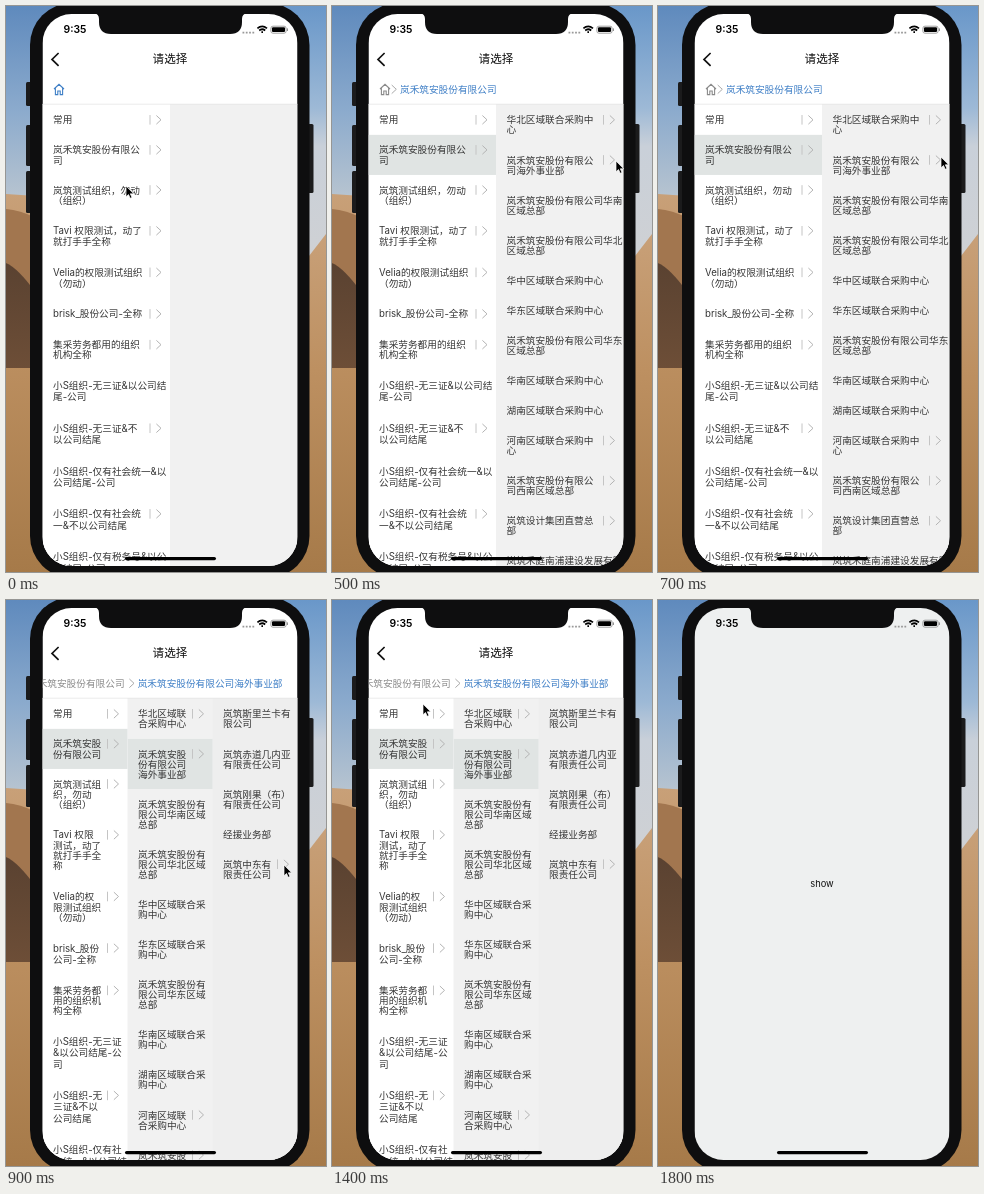
Animation of 320 by 566 pixels, one loop 2000 ms. Source, as an HTML page:

```html
<!DOCTYPE html>
<html lang="zh-CN">
<head>
<meta charset="utf-8">
<title>请选择</title>
<style>
  html, body { margin: 0; width: 100%; height: 100%; overflow: hidden; }
  svg { display: block; width: 320px; height: 566px; }
  text { font: 9.67px Inter, "Noto Sans CJK SC", "Noto Sans CJK", sans-serif; white-space: pre; }
</style>
</head>
<body>
<svg viewBox="0 0 320 566">
  <defs>
    <linearGradient id="skyLeft" x2="0" y2="1">
      <stop stop-color="#5f8abd"/><stop offset=".55" stop-color="#8cabcd"/><stop offset="1" stop-color="#b7c4d0"/>
    </linearGradient>
    <linearGradient id="skyRight" x2="0" y2="1">
      <stop stop-color="#6997c9"/><stop offset=".4" stop-color="#9db9d6"/>
      <stop offset=".55" stop-color="#c9d0d9"/><stop offset="1" stop-color="#cfd1d4"/>
    </linearGradient>
    <linearGradient id="sand" x2="0" y2="1">
      <stop stop-color="#c8a078"/><stop offset=".4" stop-color="#bd9061"/><stop offset="1" stop-color="#a67a49"/>
    </linearGradient>
    <linearGradient id="shade" x2="0" y2="1">
      <stop stop-color="#5a4231"/><stop offset="1" stop-color="#6d4e37"/>
    </linearGradient>
    <clipPath id="screen"><rect x="36.5" y="8" width="255" height="552" rx="29"/></clipPath>
  </defs>

  <rect width="160" height="192" fill="url(#skyLeft)"/>
  <rect x="160" width="160" height="255" fill="url(#skyRight)"/>
  <path d="M0 188L30 190L160 300V566H0Z" fill="url(#sand)"/>
  <path d="M0 203Q14 204 30 212V290L0 257Z" fill="#a2764f"/>
  <path d="M0 257Q12 262 30 287V362H0Z" fill="url(#shade)"/>
  <path d="M160 300L303 250L320 228V566H160Z" fill="url(#sand)"/>

  <g fill="#1b1b1c">
    <rect x="20" y="76" width="8" height="24" rx="1.5"/>
    <rect x="20" y="119" width="8" height="41" rx="1.5"/>
    <rect x="20" y="165" width="8" height="42" rx="1.5"/>
    <rect x="299" y="118" width="8.5" height="69" rx="1.5"/>
  </g>
  <rect x="24" y="-3" width="279.5" height="575" rx="42" fill="#0e0e0f"/>

  <g clip-path="url(#screen)">
    <g id="page"></g>
    <text x="57.5" y="27.3" style="font-size:10.4px;font-weight:600">9:35</text>
    <path d="M236.5 26.6h12" stroke="#999" stroke-width="1.6" stroke-dasharray="1.8 1.5"/>
    <g fill="none" stroke="#000" stroke-width="1.7">
      <path d="M251.4 22.4q4.8-4 9.6 0M253.2 24.5q3-2.5 6 0"/>
      <path d="M255.4 26.2h1.6"/>
    </g>
    <rect x="264.9" y="20.2" width="15.2" height="7" rx="2" fill="none" stroke="#888" stroke-width=".8"/>
    <rect x="266" y="21.3" width="13" height="4.8" rx="1"/>
    <path d="M281.4 22.4v2.6" stroke="#888"/>
    <g id="alert"></g>
    <rect x="119" y="551" width="91" height="3.2" rx="1.6"/>
  </g>
  <path d="M88 7Q93 8 93 13V16Q93 28 105 28H224Q236 28 236 16V13Q236 8 241 7Z" fill="#0e0e0f"/>
  <path id="cursor" d="M0 0V10.8L2.5 8.5L4.2 12.3L6 11.5L4.3 7.8H7.7Z" stroke="#fff" stroke-width=".7"/>
</svg>

<script>
const LEFT = 36.5, WIDTH = 255, TOP = 98.8, EM = 9.67;
const ORG = "岚禾筑安股份有限公司", OVERSEAS = ORG + "海外事业部", MIDEAST = "岚筑中东有限责任公司";

// A trailing ">" marks a row that opens a further column.
const levels = [
  ["常用>", ORG + ">", "岚筑测试组织，勿动（组织）>", "Tavi 权限测试，动了就打手手全称>",
   "Velia的权限测试组织（勿动）>", "brisk_股份公司-全称>", "集采劳务都用的组织机构全称>",
   "小S组织-无三证&以公司结尾-公司", "小S组织-无三证&不以公司结尾>",
   "小S组织-仅有社会统一&以公司结尾-公司", "小S组织-仅有社会统一&不以公司结尾>",
   "小S组织-仅有税务号&以公司结尾-公司"],
  ["华北区域联合采购中心>", OVERSEAS + ">", ORG + "华南区域总部", ORG + "华北区域总部",
   "华中区域联合采购中心", "华东区域联合采购中心", ORG + "华东区域总部", "华南区域联合采购中心",
   "湖南区域联合采购中心", "河南区域联合采购中心>", ORG + "西南区域总部>",
   "岚筑设计集团直营总部>", "岚筑禾庭南浦建设发展有限公司"],
  ["岚筑斯里兰卡有限公司", "岚筑赤道几内亚有限责任公司", "岚筑刚果（布）有限责任公司",
   "经援业务部", MIDEAST + ">"],
  ["中东公司设备部", "中东公司路桥分公司"]
];
const crumbs = [ORG, OVERSEAS, MIDEAST];
const fills = ["#fff", "#f1f1f1", "#eee", "#eee"];

// [start, depth of the open path, alert opacity]; depth -1 is the launch page
const states = [[0, 0, 0], [100, 0, .5], [200, 0, 1], [400, 1, 0], [900, 2, 0],
                [1000, 3, 0], [1300, 2, 0], [1600, 1, 0], [1700, 0, 0], [1800, -1, 0]];
const pointer = [[0, 120, 180], [200, 175, 295], [400, 100, 150], [500, 284, 155], [700, 283, 151],
                 [900, 278, 265], [1100, 277, 272], [1400, 91, 104], [1500, 50, 54], [1800, 48, 53]];

const $ = id => document.getElementById(id);
const escape = s => s.replace(/&/g, "&amp;");
const rect = (x, y, w, h, fill, extra = "") =>
  `<rect x="${x}" y="${y}" width="${w}" height="${h}" fill="${fill}" ${extra}/>`;
const line = (d, color, width = 1) =>
  `<path d="${d}" fill="none" stroke="${color}" stroke-width="${width}"/>`;
const label = (s, x, mid, fill = "#363636", size = EM, extra = "") =>
  `<text x="${x}" y="${mid + size * .37}" fill="${fill}" style="font-size:${size}px;${extra}">${escape(s)}</text>`;
const centred = (s, mid, fill, size, weight = 400) =>
  label(s, 164, mid, fill, size, `text-anchor:middle;font-weight:${weight}`);
const chevron = (x, y, color) => line(`M${x} ${y - 4.3}l4.6 4.3l-4.6 4.3`, color);

const charWidth = c => c > "\u2000" ? 1 : /[A-Z&]/.test(c) ? .65 : c === "-" ? .4 : .45;

function wrap(text, limit) {
  const lines = [""];
  let used = 0;
  for (const c of text) {
    const w = charWidth(c), last = lines.length - 1;
    if (used + w > limit) {
      const carry = lines[last].endsWith("（") ? "（" : "";
      if (carry) lines[last] = lines[last].slice(0, -1);
      lines.push(carry);
      used = carry.length;
    }
    lines[lines.length - 1] += c;
    used += w;
  }
  return lines;
}

function column(level, x, width, selected) {
  let y = TOP, out = rect(x, 98, width, 470, fills[level]);
  for (const row of levels[level]) {
    const opens = row.endsWith(">"), name = opens ? row.slice(0, -1) : row;
    const lines = wrap(name, (width - 10.5 - (opens ? 25 : .5)) / EM);
    const heights = lines.map(s => name.startsWith("小S") ? 11.4 : /[\w-]/.test(s) ? 11.5 : 10.05);
    const height = heights.reduce((a, b) => a + b, 20);
    if (name === selected) out += rect(x, y, width, height, "#e0e4e3");
    let lineTop = y + 10;
    const first = lineTop + heights[0] / 2, right = x + width;
    lines.forEach((s, i) => {
      out += label(s, x + 10.5, lineTop + heights[i] / 2);
      lineTop += heights[i];
    });
    if (opens) out += line(`M${right - 20} ${first - 4.8}v9.6`, "#c4c4c4") + chevron(right - 13.6, first, "#b4b4b4");
    y += height;
  }
  return out;
}

function breadcrumb(depth, dimmed) {
  const scroll = [0, 0, 46, 51][depth], grey = "#8a8a8a", blue = "#3f7fc6";
  let x = 68 - scroll;
  let out = line(`M${48 - scroll} 83l5-4.7l5 4.7m-8.6-1v6.6h2.4v-3.6h2.4v3.6h2.4v-6.6`,
                 depth || dimmed ? grey : blue, 1.1);
  for (let i = 0; i < depth; i++) {
    out += chevron(x - 8.3, 83.3, "#aaa") + label(crumbs[i], x, 83.3, i === depth - 1 ? blue : grey);
    x += crumbs[i].length * EM + 13;
  }
  return out;
}

function page(depth, dimmed) {
  if (depth < 0) return rect(LEFT, 8, WIDTH, 552, "#eef0f0") + centred("show", 284, "#111", 9.3);
  const count = Math.max(2, Math.min(3, depth + 1)), start = Math.max(0, depth - 2), width = WIDTH / count;
  let out = rect(LEFT, 8, WIDTH, 552, "#fff") + rect(LEFT, 98, WIDTH, 462, "#f1f1f1");
  for (let i = count - 1; i >= 0; i--) {
    const level = start + i;
    if (level <= depth) out += column(level, LEFT + i * width, width, level < depth ? crumbs[level] : "");
  }
  return out + line(`M${LEFT} 98.2h${WIDTH}`, "#e6e6e6", .8) + breadcrumb(depth, dimmed)
    + line("M52.6 47l-6.6 6.4l6.6 6.4", "#111", 1.7) + centred("请选择", 53, "#111", 11.6, 500);
}

$("alert").innerHTML = rect(LEFT, 8, WIDTH, 552, "#000", 'opacity=".4"')
  + rect(72, 249, 184, 71, "#f3f3f3", 'rx="9"') + line("M72 289.5h184", "#d5d5d5", .7)
  + centred("选中", 269, "#000", 11.8, 500) + centred("好", 305, "#0a7aff", 12);

function pointerAt(t) {
  const i = pointer.findIndex(p => p[0] > t);
  if (i < 0) return pointer[pointer.length - 1].slice(1);
  const [t0, x0, y0] = pointer[i - 1], [t1, x1, y1] = pointer[i], k = (t - t0) / (t1 - t0);
  return [x0 + (x1 - x0) * k, y0 + (y1 - y0) * k];
}

let shown = -1;
function draw(now) {
  const t = Math.floor(now % 2000 / 100) * 100;
  if (t !== shown) {
    shown = t;
    const [, depth, opacity] = states.filter(s => s[0] <= t).pop();
    $("page").innerHTML = page(depth, opacity > 0);
    $("alert").setAttribute("opacity", opacity);
    $("cursor").setAttribute("transform", `translate(${pointerAt(t)})`);
    $("cursor").setAttribute("visibility", depth < 0 ? "hidden" : "visible");
  }
}
const begin = performance.now();
function tick() {
  draw(performance.now() - begin);
  requestAnimationFrame(tick);
}
tick();
</script>
</body>
</html>
```
